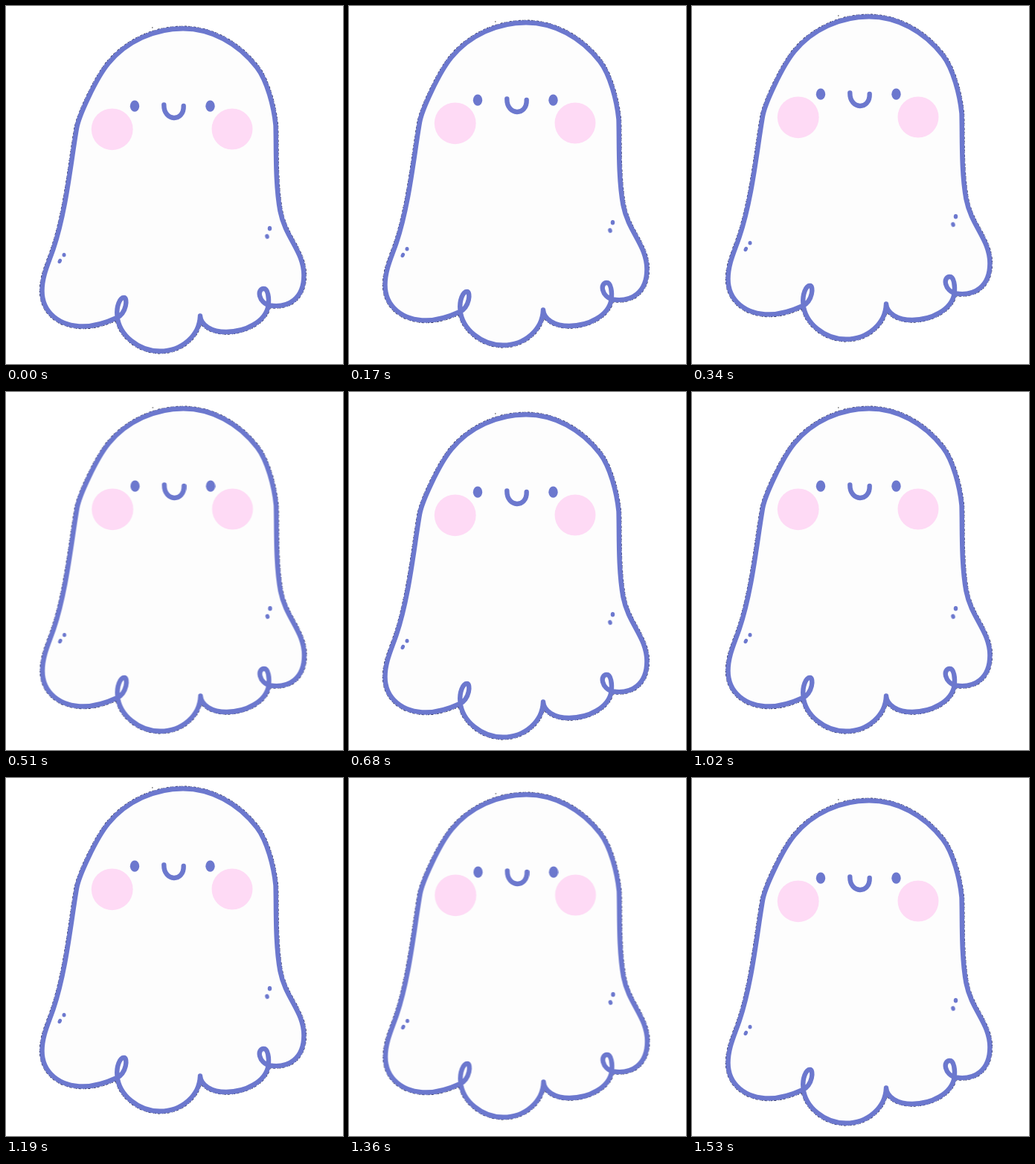
An HTML page for the animation above (1700 ms loop, 453 px wide and 480 px high).

```html
<!DOCTYPE html>
<html lang="en">
<head>
<meta charset="utf-8">
<title>Floating ghost</title>
<style>
  html, body { margin: 0; width: 100%; height: 100%; overflow: hidden; background: #fff; }
  svg { display: block; width: 100%; height: 100%; }
  .line { fill: none; stroke: #6c78ce; stroke-width: 6.4; stroke-linecap: round; stroke-linejoin: round; }
  .fringe { fill: none; stroke: #23264a; stroke-width: 7.4; stroke-dasharray: 2 1 1 3 3 2; }
  .ink { fill: #6c78ce; }
  .blush { fill: #fedaf5; }
  #shut { opacity: 0; }
</style>
</head>
<body>
<svg viewBox="0 0 453 480">
  <defs>
    <!-- Clockwise from the notch in the hem: lobe, curl, left side, crown, right side, curl, lobe. -->
    <path id="outline" d="M261 415.5
      C260 442 236 462.8 207 462.8 S152 441 149.5 416
      C148 403 153 391 158.5 391 S162 412 149 418
      C136 424 122 429.5 104 429.5 C72 429.5 48.5 411 48.5 382
      C48.5 362 57 345 63.5 326 C81 274 87 210 95 164
      C97.5 148 121 97 137.5 77 C162 47 200 30.3 238 30.3
      S312 50 337 82 C351 100 360 135 362.5 160
      C363.5 190 361.5 236 368.5 275 C375.5 311 400.4 329 400.4 361
      C400.4 392 380 405 355 401.5
      C339 398 337 379 346.5 379 C352 379 354 391 352.5 402
      C349 423 322 437 296 437 C276 437 262 428 261 415.5"/>
  </defs>
  <g id="ghost">
    <use href="#outline" class="fringe"/>
    <use href="#outline" fill="#fdfdfd"/>
    <use href="#outline" class="line"/>
    <rect x="196" y="28.5" width="1.5" height="1" fill="#333"/>
    <circle class="blush" cx="142.7" cy="165.3" r="27.9"/>
    <circle class="blush" cx="304" cy="165" r="27.5"/>
    <g id="open" class="ink">
      <ellipse cx="173" cy="134.2" rx="6.2" ry="7.6"/>
      <ellipse cx="274.5" cy="134.2" rx="6.2" ry="7.6"/>
    </g>
    <path id="shut" class="line" style="stroke-width:5"
      d="M166 132.5q7.2 9 14.4 0M267.2 132.5q7.2 9 14.4 0"/>
    <path class="line" d="M212.3 132.5C212 155.5 239.5 155.5 238.7 134"/>
    <g class="ink">
      <ellipse cx="78" cy="333.7" rx="2.5" ry="2.7"/>
      <ellipse cx="72.3" cy="342" rx="2.5" ry="3.4" transform="rotate(25 72.3 342)"/>
      <ellipse cx="354.5" cy="298.3" rx="2.7" ry="3.2"/>
      <ellipse cx="351" cy="309" rx="2.7" ry="3.2" transform="rotate(-20 351 309)"/>
    </g>
  </g>
</svg>
<script>
  const STEP_MS = 170, BOB_STEPS = 5, STEPS = 2 * BOB_STEPS, RISE = 8;

  // Holds valueAt(step) for each step, without easing between steps.
  function play(id, property, valueAt) {
    const frames = Array.from({ length: STEPS + 1 }, (_, step) => ({
      offset: step / STEPS, [property]: valueAt(step % STEPS), easing: "steps(1, end)"
    }));
    document.getElementById(id)
      .animate(frames, { duration: STEP_MS * STEPS, iterations: Infinity })
      .startTime = 0;
  }

  // Up two notches and back down, with a slight drift on the way down.
  function bob(step) {
    const phase = step % BOB_STEPS;
    const notches = 2 - Math.abs(phase - 2);
    const drift = phase === 3 ? 0.5 : 0;
    return `translate(${drift}px, ${-RISE * notches}px)`;
  }

  const blinks = step => step === BOB_STEPS;

  play("ghost", "transform", bob);
  play("open", "opacity", step => blinks(step) ? 0 : 1);
  play("shut", "opacity", step => blinks(step) ? 1 : 0);
</script>
</body>
</html>
```
